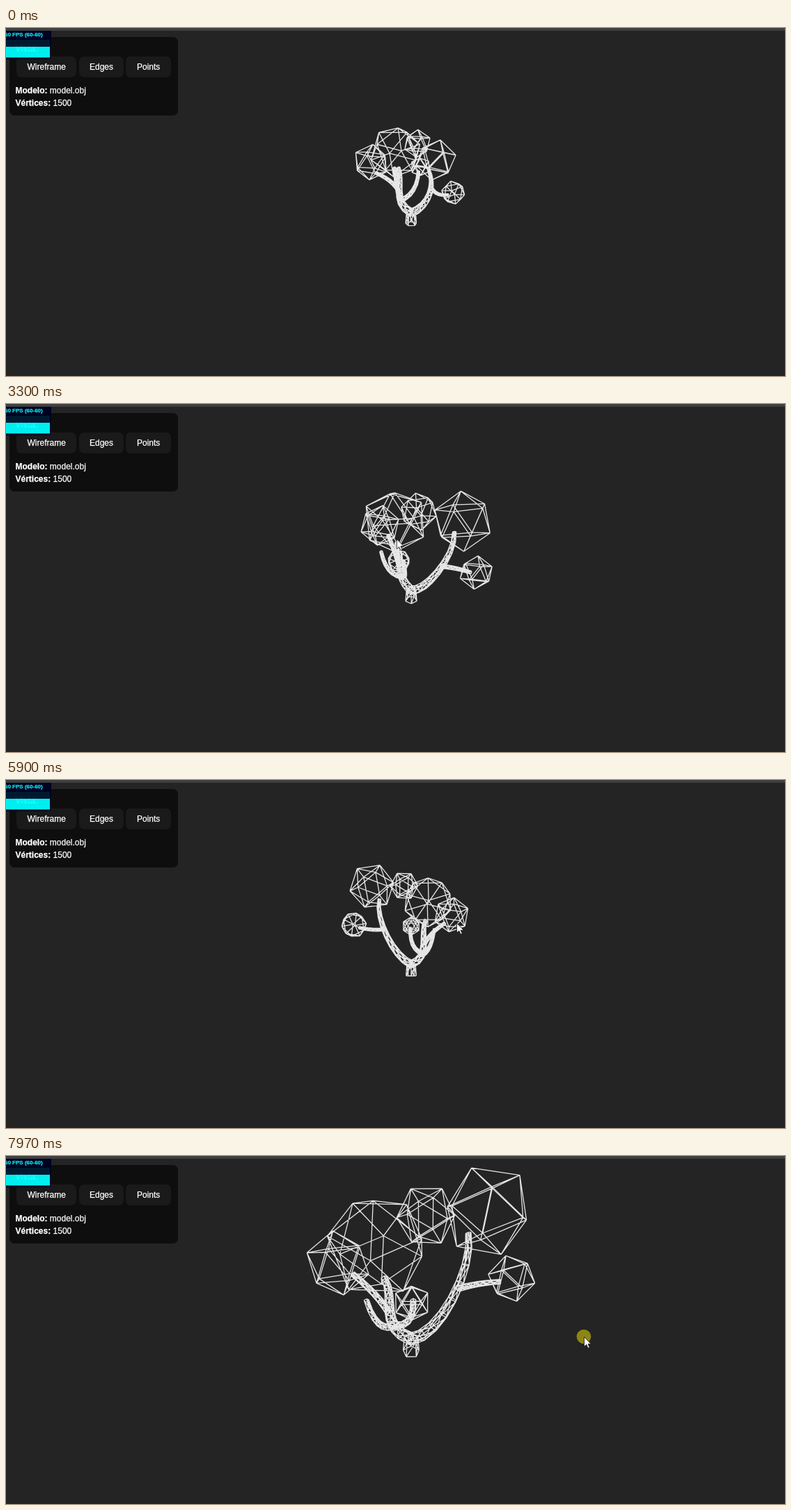
An HTML page for the animation above (8000 ms loop, 1119x501 px).

```html
<!DOCTYPE html>
<html lang="es">
<head>
<meta charset="utf-8">
<title>Wireframe viewer</title>
<style>
  html, body { margin: 0; width: 100%; height: 100%; overflow: hidden; background: #242424; }
  svg { display: block; width: 1119px; height: 501px; }
  text { font: 12px "Liberation Sans", Arial, sans-serif; fill: #fff; stroke: #fff; stroke-width: .25; white-space: pre; }
  .b { font-weight: bold; }
  .fps { font-size: 8px; font-weight: bold; fill: #0ff; stroke: #0ff; }
</style>
</head>
<body>
<svg viewBox="0 0 1119 501">
  <rect width="1119" height="501" fill="#242424"/>
  <rect width="1119" height="4" fill="#404040"/>
  <path id="tree" fill="none" stroke="#e6e6e6" stroke-width="1.3" stroke-linejoin="round"/>
  <rect x="5" y="13" width="242" height="113" rx="7" fill="#0e0e0e"/>
  <g fill="#1a1a1a">
    <rect x="15" y="41" width="86" height="30" rx="7"/>
    <rect x="105" y="41" width="64" height="30" rx="7"/>
    <rect x="172" y="41" width="65" height="30" rx="7"/>
  </g>
  <text class="b" x="13.5" y="34">Vista:</text>
  <text x="30.5" y="60">Wireframe</text>
  <text x="120" y="60">Edges</text>
  <text x="188" y="60">Points</text>
  <text x="13.5" y="94"><tspan class="b">Modelo:</tspan> model.obj</text>
  <text x="13.5" y="112"><tspan class="b">Vértices:</tspan> 1500</text>
  <g opacity=".93">
    <rect y="4" width="65" height="41" fill="#002"/>
    <rect y="17" width="63" height="10" fill="#001a33"/>
    <rect y="27" width="63" height="15.5" fill="#0ff"/>
    <text class="fps" x="-2" y="12">60 FPS (60-60)</text>
  </g>
  <g id="cursor">
    <circle id="press" r="10.3" fill="#8c8614"/>
    <path d="M.5 .5v14l3.3-3 2.3 5 2.2-1-2.2-4.8h4.3z" fill="#fff" stroke="#111" stroke-width=".8"/>
  </g>
</svg>
<script>
const $ = id => document.getElementById(id);
const RAD = Math.PI / 180, LOOP = 8000, START = 590, STEP = 67.09;
const CX = 582, CY = 282, FOCAL = 560;

// Orbit: time, azimuth, elevation, distance
const orbit = [
  [START, 149.5, -22, 825], [1660, 310, 9, 810], [2050, 336, 12, 806],
  [3300, 212, 41, 800], [4500, 120, 2, 810], [4890, 88, -13, 1045],
  [5600, 0, -3, 1045], [6440, 0, 0, 560], [6790, 0, 0, 560],
  [7300, 8, 89, 560], [7970, -181, 45, 560]
];

// Mouse: time, x, y
const mouse = [
  [START, 960, 472], [1410, 683, 365], [1660, 239, 322], [1900, 158, 302],
  [2260, 515, 235], [3300, 562, 193], [4890, 717, 252], [5200, 785, 250],
  [6440, 537, 170], [6790, 535, 169], [7300, 568, 371], [7430, 620, 475],
  [7800, 841, 330], [7970, 830, 260]
];
const released = t => t > 3150 && t < 3700 || t > 5600 && t < 6440;

const points = [], edges = [];
const polar = (r, deg, z) => [r * Math.cos(deg * RAD), r * Math.sin(deg * RAD), z];
const cross = (a, b) => [a[1] * b[2] - a[2] * b[1], a[2] * b[0] - a[0] * b[2], a[0] * b[1] - a[1] * b[0]];
const sub = (a, b) => a.map((n, i) => n - b[i]);
const mix = (a, b, p) => a.map((n, i) => n + (b[i] - n) * p);
const unit = v => { const l = Math.hypot(...v); return v.map(n => n / l); };

// Icosahedron with a vertex (fold 5) or a face (fold 3) on the z axis
function icosahedron(fold, roll) {
  const half = fold === 5 ? [[0, 0, 1]] : [];
  for (let k = 0; k < fold; k++) {
    const a = roll + 360 / fold * k;
    if (fold === 5) half.push(polar(.894, a, .447));
    else half.push(polar(.607, a, .795), polar(.982, a + 180, .188));
  }
  return half.concat(half.map(v => v.map(n => -n)));
}

// The z axis of each ball looks at the front camera
function ball(center, r, fold, roll) {
  const verts = icosahedron(fold, roll), base = points.length;
  const n = unit(sub([0, 0, FOCAL], center));
  const u = unit(cross([0, 1, 0], n)), w = cross(n, u);
  verts.forEach((v, i) => {
    points.push(center.map((c, k) => c + r * (u[k] * v[0] + w[k] * v[1] + n[k] * v[2])));
    for (let j = 0; j < i; j++) {
      if (Math.hypot(...sub(v, verts[j])) < 1.2) edges.push([base + j, base + i]);
    }
  });
}

function bezier(ctrl, p) {
  while (ctrl.length > 1) ctrl = ctrl.slice(1).map((c, i) => mix(ctrl[i], c, p));
  return ctrl[0];
}

function branch(r0, r1, ...ctrl) {
  const sides = 5, base = points.length;
  const steps = ctrl.length === 2 ? 1 : ctrl.length * 2;
  for (let i = 0; i <= steps; i++) {
    const p = i / steps, at = bezier(ctrl, p), r = r0 + (r1 - r0) * p;
    const dir = unit(sub(bezier(ctrl, p + .01), bezier(ctrl, p - .01)));
    const u = unit(cross(dir, [0, 0, 1])), v = cross(dir, u);
    for (let k = 0; k < sides; k++) {
      const [c, s] = polar(r, 90 + k * 360 / sides, 0);
      points.push(at.map((n, m) => n + u[m] * c - v[m] * s));
      const id = base + i * sides + k, next = base + i * sides + (k + 1) % sides;
      edges.push([id, next]);
      if (i) edges.push([id, id - sides], [id, next - sides]);
    }
  }
}

ball([-86, 196, 26], 50, 3, 12);
ball([38, 167, 3], 59, 5, 54);
ball([-16, 205, -1], 32, 3, 0);
ball([89, 134, 21], 39, 3, 20);
ball([0, 119, -39], 21.5, 3, 90);
ball([-127, 113, 16], 29.5, 5, 10);

const fork = [0, 26, 0];
branch(12, 10, [0, 0, 0], fork);
branch(9, 3.4, fork, [-40, 45, -15], [-80, 125, 25], [-69, 167, 33]);
branch(9, 4, fork, [46, 43, 6], [18, 95, 0], [33, 127, 0]);
branch(4.5, 3.5, [30, 72, 2], [43, 97, 8], [74, 115, 27]);
branch(5, 3, [25, 47, 3], [46, 58, -20], [54, 110, -22]);
branch(5, 3.3, [26, 50, 3], [-4, 62, -20], [-2, 114, -28]);
branch(4, 3, [-60, 104, 9], [-85, 98, 28], [-115, 106, 20]);

function sample(keys, t) {
  let i = 0;
  while (i < keys.length - 2 && t > keys[i + 1][0]) i++;
  const [a, b] = [keys[i], keys[i + 1]];
  const p = Math.min(1, Math.max(0, (t - a[0]) / (b[0] - a[0])));
  return mix(a, b, p).slice(1);
}

function project(azimuth, elevation, dist) {
  const [ca, sa] = polar(1, azimuth, 0), [ce, se] = polar(1, elevation, 0);
  return points.map(([x, y, z]) => {
    const side = x * ca - z * sa, near = x * sa + z * ca;
    const s = FOCAL / (dist - y * se - near * ce);
    return (CX + side * s).toFixed(1) + " " + (CY - (y * ce - near * se) * s).toFixed(1);
  });
}

function draw(now) {
  const t = now % LOOP;
  const held = t < START ? 0 : START + Math.round((t - START) / STEP) * STEP;
  const flat = project(...sample(orbit, held));
  $("tree").setAttribute("d", edges.map(([a, b]) => "M" + flat[a] + "L" + flat[b]).join(""));
  const [x, y] = sample(mouse, held);
  $("cursor").setAttribute("transform", `translate(${x.toFixed(1)} ${y.toFixed(1)})`);
  $("cursor").setAttribute("visibility", t < START ? "hidden" : "visible");
  $("press").setAttribute("opacity", released(held) ? 0 : 1);
}

const begin = performance.now();
function tick() {
  draw(performance.now() - begin);
  requestAnimationFrame(tick);
}
tick();
</script>
</body>
</html>
```
